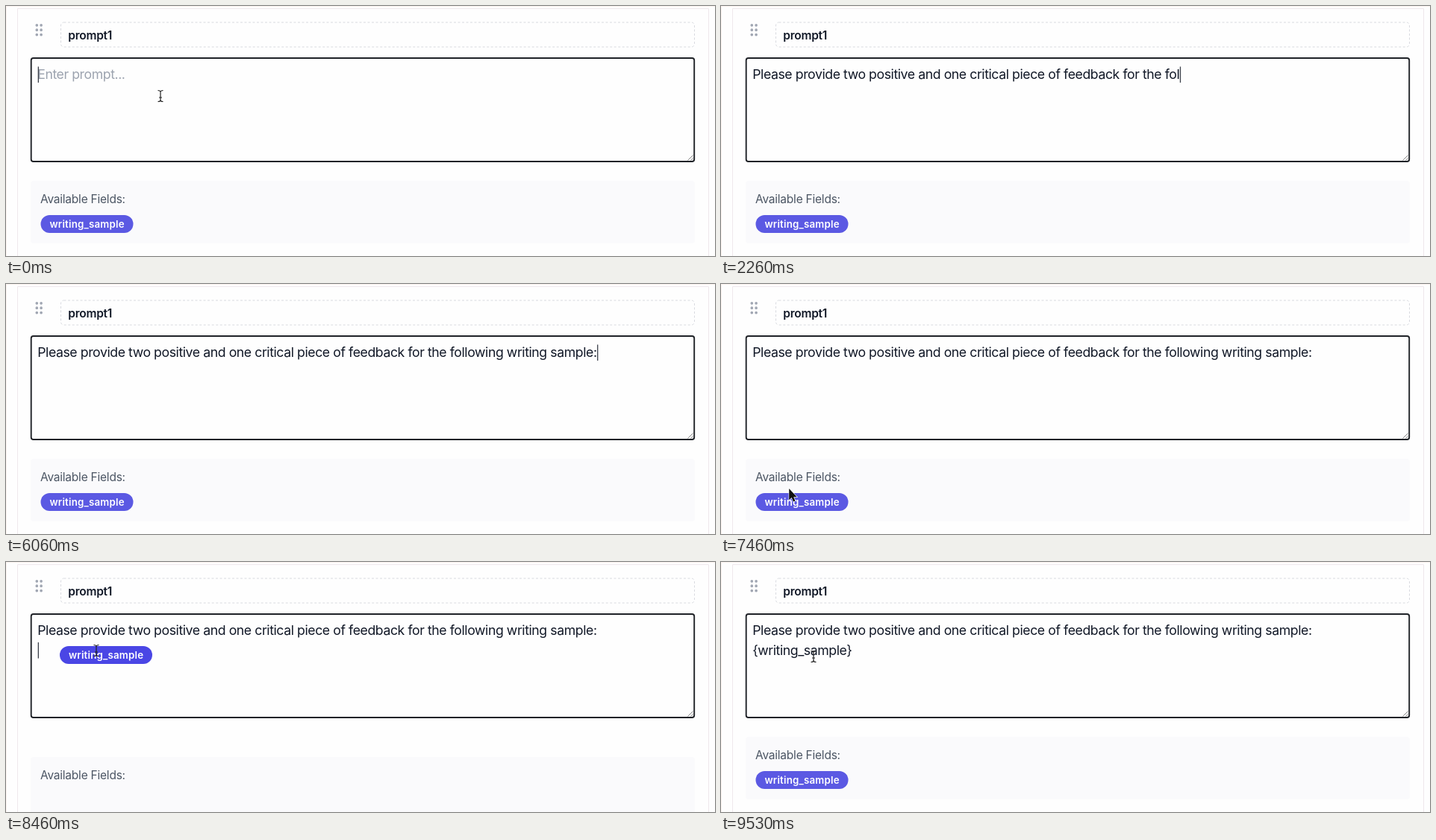
These frames come from a looping animation (950x336 px, 9660 ms). An HTML page:

```html
<!DOCTYPE html>
<html lang="en">
<head>
<meta charset="utf-8">
<title>Prompt editor</title>
<style>
  html, body { margin: 0; width: 100%; height: 100%; overflow: hidden; background: #fefefe; }
  svg { display: block; width: 950px; height: 336px; }
  text { font-family: Inter, "Liberation Sans", sans-serif; font-optical-sizing: none; white-space: pre; }
  .body { font-size: 17.7px; letter-spacing: -.0246em; fill: #111827; }
  .hint { fill: #9ca3af; }
  .name { font-size: 15.5px; font-weight: 600; letter-spacing: -.015em; fill: #111827; }
  .label { font-size: 15.5px; letter-spacing: -.0145em; fill: #4b5563; }
  .tag { font-size: 13.3px; font-weight: 600; letter-spacing: .015em; fill: #fff; }
</style>
</head>
<body>
<svg viewBox="0 0 950 336">
  <rect width="950" height="336" fill="#fefefe"/>
  <path d="M.5 0V336M0 .5H950" stroke="#fcf3ef"/>
  <path d="M15.5 336V3.5H941.5V336" fill="none" stroke="#efe8ec"/>
  <path d="M41.3 25.8h0m5.8 0h0M41.3 32.2h0m5.8 0h0M41.3 38.6h0m5.8 0h0"
        stroke="#a0a6b2" stroke-width="3.7" stroke-linecap="round"/>
  <rect x="73.5" y="22" width="849" height="33" rx="4" fill="none" stroke="#d8dadf" stroke-dasharray="3 2.5"/>
  <text class="name" x="83.2" y="44.6">prompt1</text>

  <g id="panel">
    <rect x="33" y="235" width="890" height="84" rx="4" fill="#fafafc"/>
    <text class="label" x="46" y="264.5">Available Fields:</text>
  </g>

  <rect x="33.7" y="70" width="888.5" height="139" rx="3" fill="#fefefe" stroke="#1f2227" stroke-width="1.9"/>
  <path d="M913.5 207.5l7-7M917.5 207.5l3-3" stroke="#777" stroke-width=".9"/>
  <text class="body hint" id="hint" x="42.2" y="98.4">Enter prompt...</text>
  <text class="body" id="line1" x="42.2" y="98.4"></text>
  <text class="body" id="line2" x="42.2" y="125.2">{writing_sample}</text>
  <rect id="caret" width="1.3" height="21.5" fill="#3c414b"/>

  <g id="chip">
    <rect id="pill" width="124" height="24" rx="12"/>
    <text class="tag" x="12" y="16.8">writing_sample</text>
  </g>

  <path id="arrow" d="M0 0V15.2L3.4 12L5.8 17.4L8.3 16.3L6 11.2H10.6Z"
        fill="#111" stroke="#fff" stroke-width="1.2" paint-order="stroke"/>
  <path id="beam" d="M-3.5 -7.5Q0 -7.5 0 -5.5V5.5Q0 7.5 -3.5 7.5M3.5 -7.5Q0 -7.5 0 -5.5M0 5.5Q0 7.5 3.5 7.5M-2 2H2"
        fill="none" stroke="#222" stroke-width="1.2"/>
</svg>
<script>
const LOOP = 9660, TICK = 1000 / 15;
const PROMPT = "Please provide two positive and one critical piece of feedback for the following writing sample:";
const START = 60, PAUSE = 4670, PAUSE_LENGTH = 870, NEWLINE = 6460;
const HOVER = 7260, GRAB = 7760, DROP = 8530, INSERT = 9130;

const $ = id => document.getElementById(id);
const show = (id, on) => $(id).setAttribute("display", on ? "inline" : "none");
const move = (id, x, y) => $(id).setAttribute("transform", `translate(${x} ${y})`);
const clamp = (v, lo, hi) => Math.min(hi, Math.max(lo, v));
const mix = (a, b, p) => a + (b - a) * p;
const ease = (t, from, to) => {
  const p = clamp((t - from) / (to - from), 0, 1);
  return p * p * (3 - 2 * p);
};

// Half the prompt is pasted, then one letter follows every second tick.
function typedCount(t) {
  const worked = t - clamp(t - PAUSE, 0, PAUSE_LENGTH);
  return t < START ? 0 : Math.floor(57.1 + worked / (2 * TICK));
}

function caretOn(t) {
  const idle = t - NEWLINE - 20;
  return idle < 0 || t < INSERT && idle % 990 < 450;
}

// Rest on the chip, carry it up to the text, then drift away.
function mouseAt(t) {
  if (t < START) return [207, 121];
  const hover = ease(t, HOVER, 7660), carry = ease(t, GRAB, 8330), drift = ease(t, 8930, 9260);
  return [87 + 8 * hover + 26 * carry + 3 * drift, 262 + 25 * hover - 168 * carry + 8 * drift];
}

function chipAt(t) {
  const [x, y] = mouseAt(Math.min(t, DROP));
  const p = 1 - (1 - clamp((t - DROP) / 400, 0, 1)) ** 3;
  return [mix(x - 49, 33.5, p), mix(y - 6, 72, p)];
}

function draw(t) {
  const count = typedCount(t);
  const secondLine = t >= NEWLINE;
  $("line1").textContent = PROMPT.slice(0, count);
  show("hint", !count);
  show("line2", t >= INSERT);

  const end = count && !secondLine ? $("line1").getComputedTextLength() : 0;
  move("caret", 42.7 + end, secondLine ? 108 : 81.5);
  show("caret", caretOn(t));

  const dragging = t >= GRAB && t < INSERT;
  move("panel", 0, dragging ? 27 : 0);
  move("chip", ...(dragging ? chipAt(t) : [46.5, 281]));
  $("pill").setAttribute("fill", dragging ? "#4a46e5" : "#5b59e3");

  const mouse = mouseAt(t);
  const visible = t < START || t >= HOVER;
  const overText = mouse[1] < 210;
  show("arrow", visible && !overText);
  show("beam", visible && overText);
  move(overText ? "beam" : "arrow", ...mouse);
}

function frame() {
  const t = performance.now() % LOOP;
  draw(Math.floor((t + 7) / TICK) * TICK);
  requestAnimationFrame(frame);
}
frame();
</script>
</body>
</html>
```
